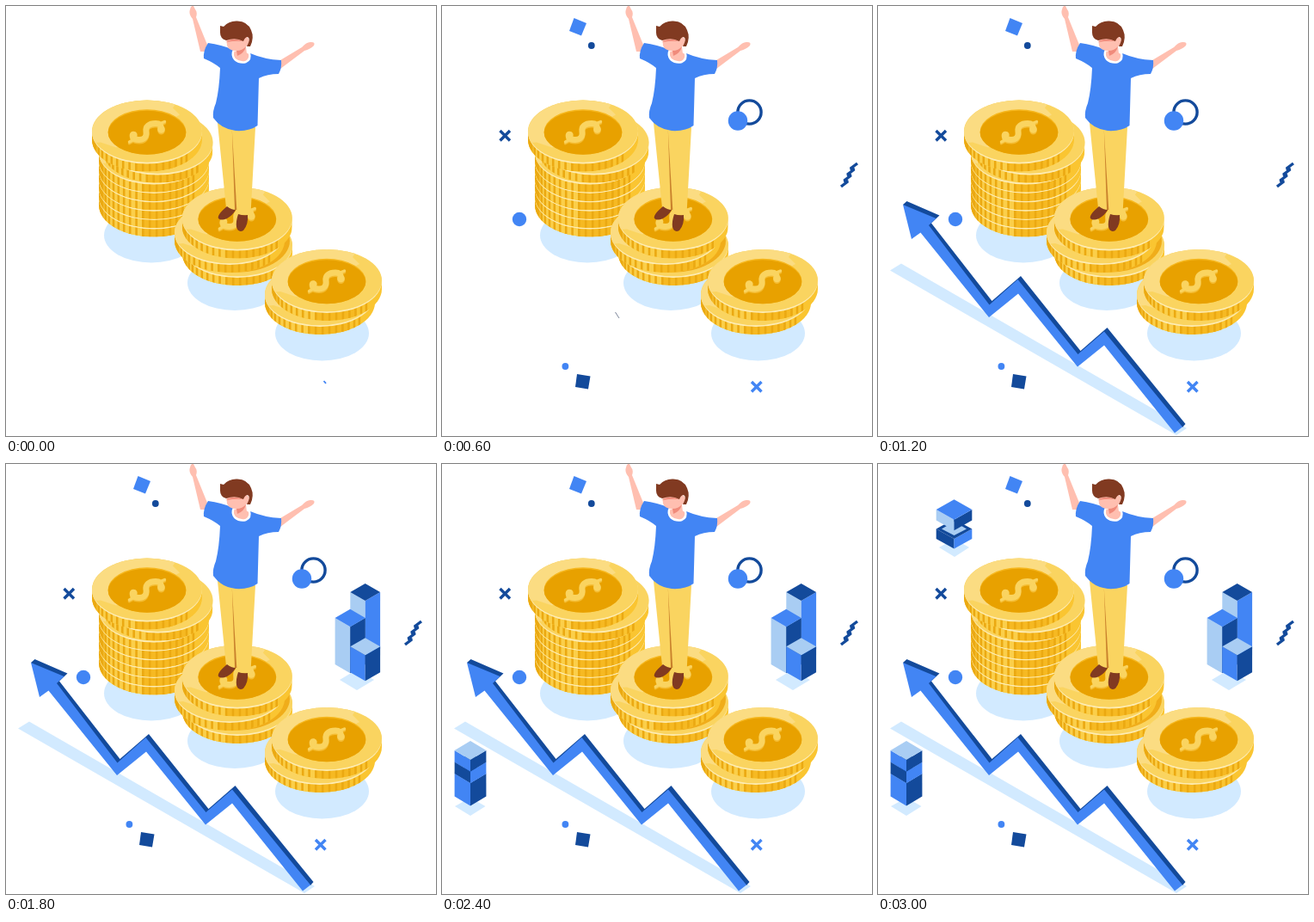
An HTML page that plays this animation: 500x500 px, repeating every 3600 ms.

```html
<!DOCTYPE html>
<html lang="en">
<head>
<meta charset="utf-8">
<title>Growth</title>
<style>
html, body { margin: 0; width: 100%; height: 100%; overflow: hidden; background: #fff; }
svg { display: block; width: 100vw; height: 100vh; }
.blue { fill: #4285f4; }
.navy { fill: #134a9b; }
.sky { fill: #a9cdf3; }
.shade { fill: #d2eaff; }
.skin { fill: #ffbfb0; }
.brown { fill: #813a21; }
.line { fill: none; stroke-width: 3.4; stroke-linejoin: bevel; }
</style>
</head>
<body>
<svg viewBox="0 0 500 500">
  <defs>
    <clipPath id="rim"><ellipse rx="64" ry="37"/></clipPath>
    <clipPath id="well"><ellipse rx="45.5" ry="26.3"/></clipPath>
    <clipPath id="edge"><path d="M-64 0V9A64 37 0 0 0 64 9V0Z"/></clipPath>
    <g id="side" clip-path="url(#edge)">
      <path fill="#fac531" d="M-64 0H64V50H-64Z"/>
      <path fill="#fbcf4a" d="M-64 0H-13V50H-64Z"/>
      <path fill="#f6b922" d="M-13 0H34V50H-13Z"/>
      <path id="ribs" stroke="#eba912" stroke-width="2.600"/>
    </g>
    <g id="face">
      <ellipse rx="64" ry="37" fill="#fdecb4"/>
      <ellipse rx="64" ry="36.2" cy="-.9" fill="#fad460"/>
      <path clip-path="url(#rim)" fill="#fbdc82" d="M-70 13L-54 12L-36 18L38 -20L30 -28L38 -40H-70Z"/>
    </g>
    <g id="plain"><use href="#side"/><use href="#face"/></g>
    <g id="shaded">
      <use href="#plain"/>
      <g clip-path="url(#rim)"><ellipse cx="-3" cy="-6" rx="64" ry="37" fill="#f0ad1a"/></g>
    </g>
    <g id="coin">
      <use href="#plain"/>
      <ellipse rx="45.5" ry="26.3" fill="#f6b71d"/>
      <g clip-path="url(#well)"><ellipse rx="45.5" ry="26.3" cy="1.6" fill="#e8a100"/></g>
      <g fill="none" stroke-linecap="round" stroke-linejoin="round">
        <use href="#sign" y="1.6" stroke="#f4bc32"/>
        <use href="#sign" stroke="#fad460"/>
      </g>
    </g>
    <g id="sign">
      <path stroke-width="6.800" d="M16 -4Q17 -10 10 -10C2 -10 -2 -6 -1 -1C0 5 -3 9 -9 9C-16 9 -18 6 -15 3"/>
      <path stroke-width="3.400" d="M14 -9.500L20.500 -12M-20.500 11.500L-14 8"/>
      <path stroke-width="8.600" d="M16.500 -3.500V-3M-16 3.500V4"/>
    </g>
  </defs>

  <g class="shade">
    <ellipse cx="169" cy="266.500" rx="55" ry="32"/>
    <ellipse cx="266" cy="322" rx="55" ry="32"/>
    <ellipse cx="367.500" cy="380.500" rx="54.500" ry="32"/>
  </g>
  <g id="stacks"></g>

  <g id="person">
    <path fill="#fad460" d="M246 136L290 141L284.500 242Q276 245 269 242L267 237Q261 239 256 235Z"/>
    <path fill="#c9812c" d="M262.800 144L268.300 237L266 237Z"/>
    <path class="brown" d="M257 233Q262 237 267 237Q264 243 257 247Q250 250 247 247Q245 243 257 233ZM270 242Q276 244 281 243Q282 254 276 261Q270 264 268 257Q267 251 270 242Z"/>
    <path class="skin" d="M226 53L217 15Q212 9 214 4Q215 -1 218 0L220 4Q223 7 221 13L234 45L232 53Z"/>
    <path class="skin" d="M319 63L344 48Q350 41 355 42Q360 42 358 46Q354 50 347 52L319 73Z"/>
    <path class="blue" d="M235 43Q250 45 265 51L284 55Q300 62 320 63Q321 72 317 79Q304 79 294 84L292.500 139Q283 146 267 145Q250 143 241 130Q240 122 244 113Q248 97 249 72Q242 66 230 61Q229 52 235 43Z"/>
    <path class="skin" stroke="#fff" stroke-width="2.400" d="M265 51Q262 57 266 62Q272 67 279 65Q285 62 283 55L278 52Z"/>
    <path class="skin" d="M256 36L280 36Q285 40 282 45L279 47L280 56L267 55L268 52Q259 52 257 46Z"/>
    <path fill="#f08b7b" d="M256 42Q263 36 276 41Q267 40 256 42ZM268 52Q275 52 279 47Q277 55 269 58Z"/>
    <path class="brown" d="M249 23L253 24Q259 17 269 17.500Q281 18 285 28Q289 37 284 47L280 47Q285 38 281 36Q278 36 276 41Q267 36 256 40Q249 38 249 31Z"/>
  </g>

  <path data-from="0" data-to="1" class="line" stroke="#4285f4" style="stroke-width:1.800" d="M369.500 436L372 438.800"/>
  <path data-from="1" data-to="2" class="line" stroke="#7d879a" style="stroke-width:1" d="M201.500 356L206 363"/>

  <g data-from="1">
    <path class="blue" d="M153.500 14L168 20L162 34.500L148 29Z"/>
    <circle class="navy" cx="173.800" cy="46" r="3.900"/>
    <circle class="blue" cx="90" cy="248" r="8.200"/>
    <circle class="line" stroke="#134a9b" cx="357.500" cy="123.500" r="13.600"/>
    <circle class="blue" cx="344" cy="133.500" r="11.200"/>
    <circle class="blue" cx="143.400" cy="419" r="3.900"/>
    <path class="navy" d="M157 428L172.500 430.500L170 445.500L155 443Z"/>
    <path class="line" stroke="#134a9b" d="M67.500 145L79 156.500M79 145L67.500 156.500"/>
    <path class="line" stroke="#4285f4" d="M360 437L371.500 448.500M371.500 437L360 448.500"/>
    <path class="line" stroke="#134a9b" d="M483 183L475 189L479.300 190L471.300 196L475.600 197L467.600 203L471.900 204L464 210"/>
  </g>

  <g data-from="2">
    <path class="shade" d="M14 307.500L27 299.500L359 491L347 499Z"/>
    <path class="navy" d="M29 231L33.500 227L71.500 243.500L62 252.500L132.500 343L166 314L235.500 401L266.500 374L357.500 486L354 490L263 384L232 409L163 323L129 352L56 257Z"/>
    <path class="blue" d="M29 231L67.500 247L59 255L129.500 347.500L162.500 318L232.500 405L263 378.500L354 489.500L345 496.500L263 394.500L232 419.500L163 334.500L129 362L49.500 263.500L39 271Z"/>
  </g>

  <g data-from="3">
    <path class="shade" d="M388 251L408 239L428 251L408 263Z"/>
    <g id="towers"></g>
  </g>
  <g data-from="4">
    <path class="shade" d="M15 398L33 388L50.500 398L33 409Z"/>
    <g id="pillar"></g>
  </g>
  <g data-from="5">
    <path class="shade" d="M71 97L89 87L106 97L89 108Z"/>
    <g id="cube"></g>
  </g>
</svg>
<script>
const $ = id => document.getElementById(id);
const STEP = 600, COUNT = 6;

// Ribs are evenly spaced around the coin, so they crowd towards its left edge
let ribs = "";
for (let a = -1.45; a < 0.85; a += 0.125) ribs += `M${(64 * Math.sin(a)).toFixed(1)} 0V50`;
$("ribs").setAttribute("d", ribs);

const use = (kind, x, y) => `<use href="#${kind}" x="${x}" y="${y}"/>`;
let coins = "";
for (let i = 0; i < 6; i++) coins += use("plain", 172, 222.5 - i * 10.4);
coins += use("plain", 176.5, 159.5) + use("coin", 164, 146.5);
coins += use("shaded", 269, 279) + use("plain", 260, 264) + use("coin", 268.8, 247.5);
coins += use("plain", 365, 336) + use("coin", 373, 320);
$("stacks").innerHTML = coins;

// Isometric box: x, y mark the centre of the top face
const poly = (cls, pts) => `<polygon class="${cls}" points="${pts.join(" ")}"/>`;
function box(x, y, w, h, depth, top, left, right) {
  return poly(left, [x - w, y, x, y + h, x, y + h + depth, x - w, y + depth]) +
    poly(right, [x + w, y, x, y + h, x, y + h + depth, x + w, y + depth]) +
    poly(top, [x - w, y, x, y - h, x + w, y, x, y + h]);
}

$("towers").innerHTML =
  box(417.7, 149, 17.4, 10, 66, "navy", "sky", "blue") +
  box(400.2, 179, 17.6, 10.2, 54, "blue", "sky", "navy") +
  box(417.7, 212.3, 17.4, 10, 30, "sky", "blue", "navy");

$("pillar").innerHTML =
  box(33, 360, 18.4, 11, 26.5, "blue", "blue", "navy") +
  box(33, 346.5, 18.4, 11, 13.5, "navy", "navy", "blue") +
  box(33, 333, 18.4, 11, 13.5, "sky", "blue", "navy");

$("cube").innerHTML =
  box(88.5, 75.5, 20.8, 11.5, 11.5, "navy", "navy", "blue") +
  poly("sky", [74, 75.5, 88.5, 67, 103, 75.5, 88.5, 83]) +
  box(88.5, 53, 20.8, 11.8, 12.5, "blue", "sky", "navy");

const parts = [...document.querySelectorAll("[data-from]")];
function draw(ms) {
  const step = Math.floor(ms / STEP) % COUNT;
  for (const el of parts) {
    const { from, to = COUNT } = el.dataset;
    el.style.display = step >= +from && step < +to ? "" : "none";
  }
}

const start = performance.now();
function tick() {
  draw(performance.now() - start);
  requestAnimationFrame(tick);
}
tick();
</script>
</body>
</html>
```
